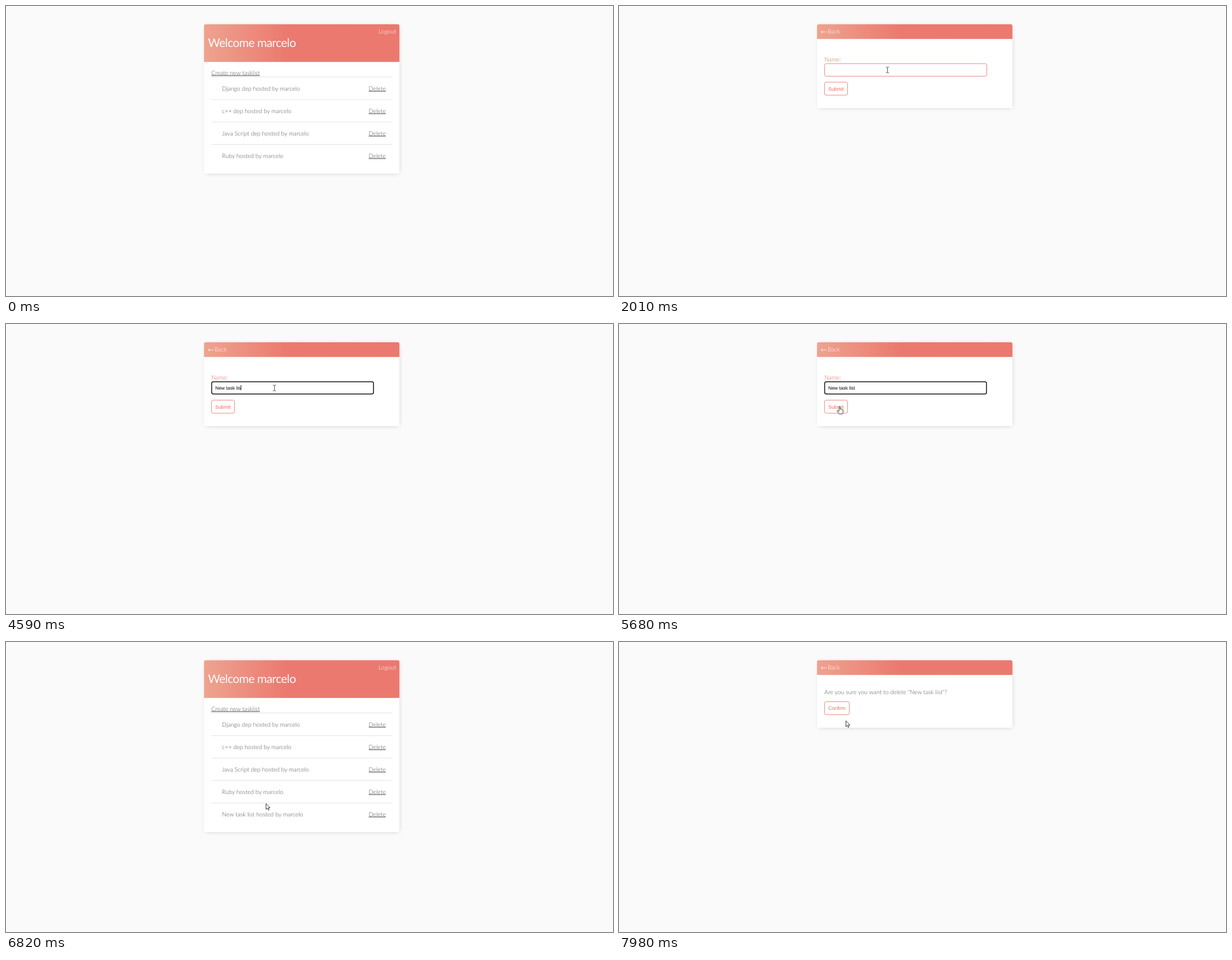
Recreate the animation shown at these times as an HTML page. Size 1082x517 px, loop 8 s.

```html
<!DOCTYPE html>
<html lang="en">
<head>
<meta charset="utf-8">
<title>Task lists</title>
<style>
html, body { margin: 0; width: 100%; height: 100%; overflow: hidden; background: #fafafa; }
#shade {
  position: absolute; left: 353px; top: 33px; width: 348px;
  border-radius: 3.3px 3.3px 0 0; box-shadow: 1.3px 1.3px 8.7px -2.7px rgba(0,0,0,.23);
}
svg { position: absolute; left: 0; top: 0; }
text { font: 300 10.6px Lato, sans-serif; fill: #4b5156; text-rendering: geometricPrecision; white-space: pre; }
.link { text-decoration: underline; }
.white { fill: #fff; }
.title { font-size: 21px; font-weight: 400; letter-spacing: -.55px; fill: #fdfbfb; }
.label { fill: #e0605a; }
.button { font: 8.85px "Liberation Sans", Arial, sans-serif; fill: #e8685e; }
.value { font: 8.5px "Liberation Sans", Arial, sans-serif; fill: #000; }
.option { font-size: 8.4px; font-weight: 700; fill: #15141a; }
</style>
</head>
<body>
<div id="shade"></div>
<svg width="1082" height="517" viewBox="0 0 1082 517">
  <defs>
    <linearGradient id="coral">
      <stop stop-color="#eea390"/><stop offset=".43" stop-color="#eb796f"/>
    </linearGradient>
  </defs>
  <g id="view"></g>
</svg>
<script>
const LOOP = 8000, USER = 'marcelo', NAME = 'New task list';
const LISTS = ['Django dep', 'c++ dep', 'Java Script dep', 'Ruby', NAME];
const OPTIONS = ['newnamethatdoesnexist', 'New Task', 'Ruby', 'Java Script dep', 'c++ dep', 'Django dep'];
const KEYS = [2870, 3230, 3430, 3510, 3640, 3860, 4010, 4080, 4160, 4310, 4380, 4590, 4810];
const FOCUS = 2090, BLUR = 5890, TOP = 32.5;

// Pointer path: time, x, y
const PATH = [
  [280, 253.5, 390], [500, 318, 262], [780, 396, 127], [1000, 396, 127], [1150, 399, 120],
  [1580, 399, 120], [1870, 455, 111], [2010, 478.5, 114], [5160, 478.5, 114],
  [5300, 456, 103], [5600, 393, 147], [6040, 393, 147],
  [6250, 472, 112], [6820, 463.5, 288], [7040, 605, 317], [7260, 657, 307],
  [7620, 657, 307], [7910, 446, 136.5], [7980, 404.5, 140.5], [LOOP, 404.5, 140.5]
];

const $ = id => document.getElementById(id);
const text = (x, y, s, cls = '') => `<text x="${x}" y="${y}" class="${cls}">${s}</text>`;
const box = (x, y, w, h, stroke, width) =>
  `<rect x="${x}" y="${y}" width="${w}" height="${h}" rx="3" fill="#fff" stroke="${stroke}" stroke-width="${width}"/>`;
const button = (y, w, s) => box(366.4, y, w, 23.2, '#eb796f', .9) + text(373, y + 14.7, s, 'button');
const back = () => text(372, 49.3, 'Back', 'white') +
  '<path d="M370 46.2H360.3M363 43.7L360.3 46.2L363 48.7" fill="none" stroke="#fff" stroke-width=".8"/>';

// Rectangle with rounded top corners
const panel = (bottom, fill) =>
  `<path d="M353 ${bottom}V${TOP + 3.3}q0-3.3 3.3-3.3H698q3.3 0 3.3 3.3V${bottom}Z" fill="${fill}"/>`;

function home(count) {
  let s = text(664, 49.3, 'Logout', 'white') + text(360, 73, 'Welcome ' + USER, 'title') +
    text(366, 122.5, 'Create new tasklist', 'link');
  LISTS.slice(0, count).forEach((name, i) => {
    const y = 126 + 40 * i;
    s += `<rect x="366" y="${y + (i ? .4 : 0)}" width="322" height="1" fill="#e2e2e2"/>` +
      text(385, y + 24.5, `${name} hosted by ${USER}`) + text(646.5, y + 24.5, 'Delete', 'link');
  });
  return s;
}

function options(t) {
  if (t < 2160 || t >= 4160) return '';
  const list = t < 2870 ? OPTIONS : t < 3510 ? OPTIONS.slice(0, 2) : ['New Task'];
  const h = 13 + 25.2 * list.length;
  return `<path d="M366 125.3V${122 + h}q0 3 3 3H653.5q3 0 3-3V125.3Z" fill="#fff" stroke="#2b2a33"/>` +
    list.map((s, i) => text(375, 148 + 25.2 * i, s, 'option')).join('');
}

function form(t) {
  const focus = t >= FOCUS && t < BLUR;
  const typed = KEYS.filter(k => k <= t);
  const since = t - (typed.length ? typed[typed.length - 1] : FOCUS);
  let s = back() + text(366, 99, 'Name:', 'label') + button(135.8, 41, 'Submit');
  s += focus ? box(366.6, 102.9, 288.5, 21.8, '#101010', 1.5) : box(366.4, 102.8, 289.3, 22.4, '#eb796f', .9);
  s += `<text id="value" class="value" x="373" y="116.7">${NAME.slice(0, typed.length)}</text>`;
  if (focus && since % 1000 < 500) s += '<rect id="caret" x="373" y="109" width="1" height="9"/>';
  return s + options(t);
}

const confirm = () => back() + text(366, 92.8, `Are you sure you want to delete "${NAME}"?`) +
  button(106.4, 44.2, 'Confirm');

const POINTERS = {
  arrow: '<path d="M0 0V10.4L2.4 8.2L3.9 11.7L5.5 11L4 7.6H7.2Z" fill="#fff" stroke="#222" stroke-width=".9"/>',
  beam: '<path d="M-2.7-5h2.2l.5.5.5-.5h2.2M-2.7 5h2.2l.5-.5.5.5h2.2M0-4.5V4.5" fill="none" stroke="#222" stroke-width=".8"/>',
  hand: '<path d="M-.9.6Q.1-.7 1.1.6V5Q2.2 4 3 5.2Q4.2 4.5 4.8 5.7Q6.4 5.4 6.4 7V9.6Q6.4 11.5 5.2 13.4H-.6Q-1.8 11.2-4.2 8.5Q-4.3 6.8-2.5 7.4L-.9 8.8Z" fill="#fff" stroke="#222" stroke-width=".9"/>'
};

function pointer(t, page) {
  if (t < PATH[0][0] || (t >= 6040 && t < 6250)) return '';
  const i = PATH.findIndex(p => p[0] > t);
  const [t0, x0, y0] = PATH[i - 1], [t1, x1, y1] = PATH[i];
  // Moves advance in steps of about 72 ms
  const n = Math.max(1, Math.round((t1 - t0) / 72));
  const u = Math.floor((t - t0) / (t1 - t0) * n) / n;
  const x = x0 + (x1 - x0) * u, y = y0 + (y1 - y0) * u;
  const over = (l, top, r, b) => x > l && x < r && y > top && y < b;
  let kind = 'arrow';
  if (page === 'form') {
    if (over(366, 102, 656, 126)) kind = 'beam';
    if (over(366, 135, 408, 160)) kind = 'hand';
  } else if (page === 'home' && (over(366, 113, 450, 125) || over(646, 300, 677, 313))) kind = 'hand';
  return `<g transform="translate(${x} ${y})">${POINTERS[kind]}</g>`;
}

let last = '';
function draw(t) {
  const page = t < 1440 || (t >= 5970 && t < 7550) ? 'home' : t < 5970 ? 'form' : 'confirm';
  const count = t < 1440 ? 4 : 5;
  const bottom = page === 'home' ? 138.8 + 40 * count : page === 'form' ? 182 : 152.5;
  const body = page === 'home' ? home(count) : page === 'form' ? form(t) : confirm();
  const markup = panel(bottom, '#fff') + panel(page === 'home' ? 99.7 : 58.7, 'url(#coral)') +
    body + pointer(t, page);
  if (markup === last) return;
  last = markup;
  $('shade').style.height = bottom - 33 + 'px';
  $('view').innerHTML = markup;
  const caret = $('caret');
  if (caret) caret.setAttribute('x', 373 + ($('value').textContent ? $('value').getComputedTextLength() : 0));
}

function frame() {
  draw(performance.now() % LOOP);
  requestAnimationFrame(frame);
}
frame();
</script>
</body>
</html>
```
